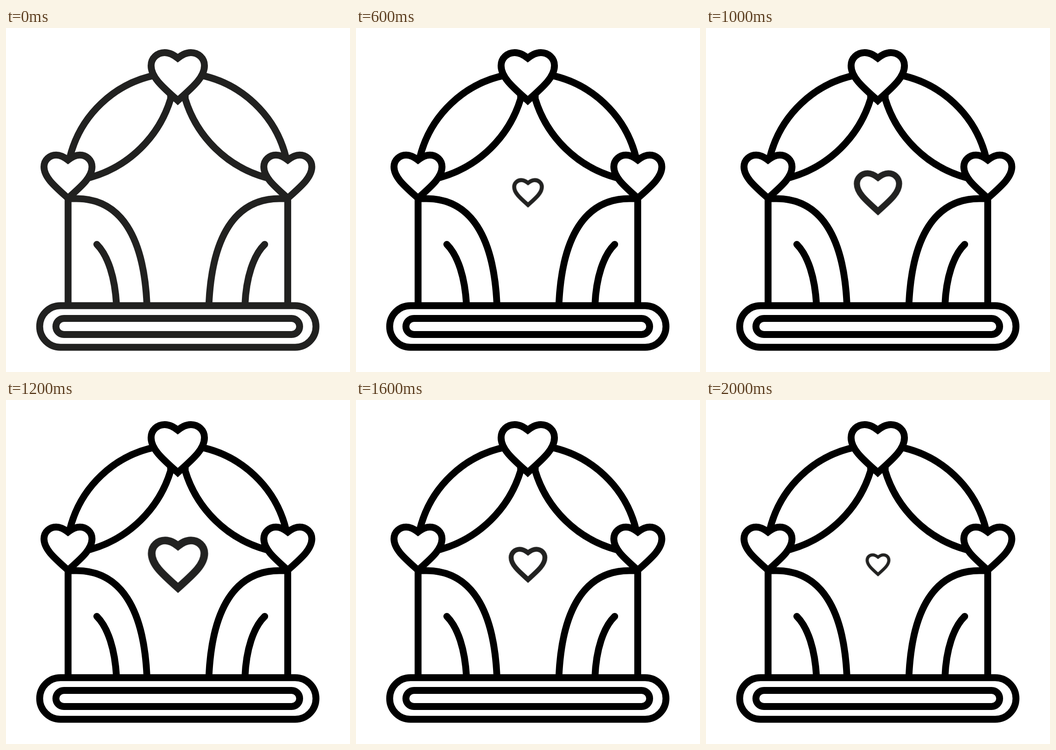
An HTML page for the animation above (2200 ms loop, 748 by 748 pixels).

```html
<!DOCTYPE html>
<html lang="en">
<head>
<meta charset="utf-8">
<title>Wedding arch</title>
<style>
  html, body { margin: 0; width: 100%; height: 100%; overflow: hidden; background: #fff; }
  svg { display: block; width: 100%; height: 100%; }
  .arch {
    fill: none; stroke: #000; stroke-width: 15;
    animation: ink 2200ms step-end infinite;
  }
  .knot { fill: #fff; }
  .pulse {
    fill: none; stroke: #222221; stroke-width: 16.8;
    transform-origin: 374px 358.6px;
    animation: beat 2200ms step-end infinite;
  }
  @keyframes ink {
    0% { stroke: #212120; }
    18.18%, 100% { stroke: #000; }
  }
  @keyframes beat {
    0% { transform: scale(1); visibility: hidden; }
    18.18% { transform: scale(.412); visibility: visible; }
    27.27% { transform: scale(.525); visibility: visible; }
    36.36% { transform: scale(.641); visibility: visible; }
    45.45% { transform: scale(.802); visibility: visible; }
    54.54% { transform: scale(1); visibility: visible; }
    63.63% { transform: scale(.802); visibility: visible; }
    72.72% { transform: scale(.641); visibility: visible; }
    81.81% { transform: scale(.525); visibility: visible; }
    90.9%, 100% { transform: scale(.412); visibility: visible; }
  }
</style>
</head>
<body>
<svg viewBox="0 0 748 748">
  <defs>
    <path id="heart" d="M0 0C-7.5-5.8-16.5-12-28.5-12C-44.5-12-58 0-58 16.5C-58 42-32 63.5 0 92.3C32 63.5 58 42 58 16.5C58 0 44.5-12 28.5-12C16.5-12 7.5-5.8 0 0Z"/>
    <g id="side">
      <path d="M138.4 283A242 242 0 0 1 330 101.5"/>
      <path d="M358 138V154A255 255 0 0 1 183 325L170 328"/>
      <path d="M135 365V604"/>
      <path d="M135 371H153C250 371 300 455 306.5 602"/>
      <use href="#heart" class="knot" transform="translate(134.8 287) scale(.9)" stroke-width="16.67"/>
    </g>
  </defs>
  <g class="arch">
    <use href="#side"/>
    <use href="#side" transform="matrix(-1 0 0 1 747.6 0)"/>
    <use href="#heart" class="knot" x="373.5" y="65.5"/>
    <g stroke-linecap="round">
      <path d="M197.5 470.5C222 495 237 543 240.3 602"/>
      <path d="M562.5 470.5C538 494 522 543 519.6 602"/>
    </g>
    <rect x="73.2" y="603.8" width="600.8" height="90.4" rx="45.2"/>
    <rect x="108.5" y="631.5" width="530" height="35" rx="17.5"/>
  </g>
  <g class="pulse">
    <use href="#heart" transform="translate(374 317.3) scale(.987)"/>
  </g>
</svg>
</body>
</html>
```
